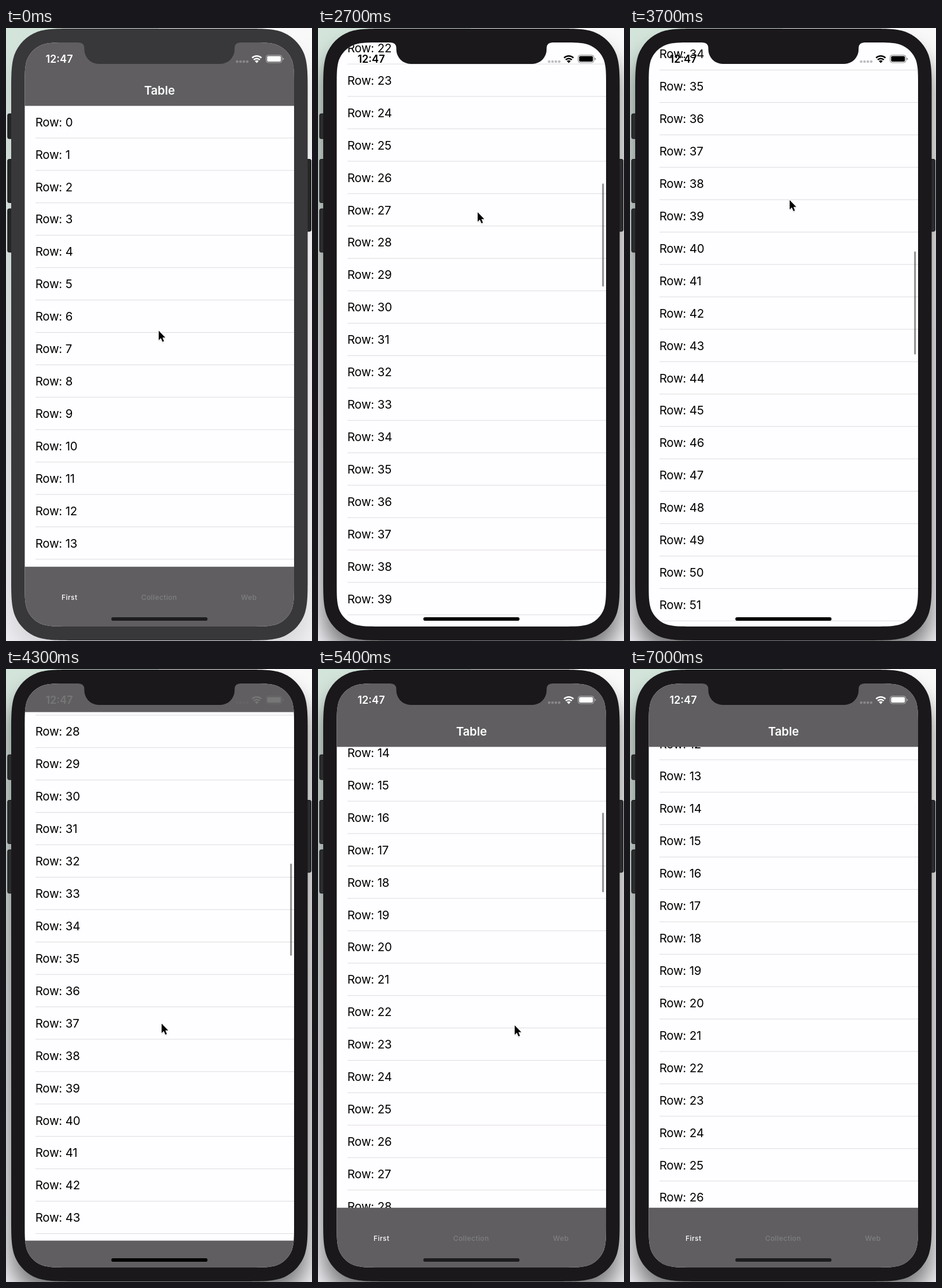
These frames come from a looping animation (529x1058 px, 7400 ms). An HTML page:

```html
<!DOCTYPE html>
<html lang="en">
<head>
<meta charset="utf-8">
<title>Table</title>
<style>
  html, body { margin: 0; width: 100%; height: 100%; overflow: hidden; background: #eee; }
  svg { display: block; width: 100vw; height: 100vh; }
  text { font-family: Inter, Roboto, sans-serif; }
  .row { font-size: 20.4px; letter-spacing: -.3px; word-spacing: .6px; fill: #000; }
  .title { font-size: 20.4px; font-weight: 600; letter-spacing: -.1px; fill: #fff; text-anchor: middle; }
  .clock { font-size: 18.1px; font-weight: 600; text-anchor: middle; }
  .tab { font-size: 12.1px; font-weight: 500; letter-spacing: .4px; fill: #7f7e81; text-anchor: middle; }
</style>
</head>
<body>
<svg viewBox="0 0 529 1058" preserveAspectRatio="none">
  <defs>
    <linearGradient id="wallL" x2="0" y2="1">
      <stop offset="0" stop-color="#d3e4db"/>
      <stop offset=".35" stop-color="#d9e3df"/>
      <stop offset=".65" stop-color="#e4e6e9"/>
      <stop offset="1" stop-color="#efeff3"/>
    </linearGradient>
    <linearGradient id="wallR" x2="0" y2="1">
      <stop offset="0" stop-color="#f9f9f9"/>
      <stop offset=".5" stop-color="#f3f0f3"/>
      <stop offset="1" stop-color="#f0f0f3"/>
    </linearGradient>
    <filter id="blur" x="-20%" y="-10%" width="140%" height="120%"><feGaussianBlur stdDeviation="18"/></filter>
    <filter id="soft" x="-50%" y="-50%" width="200%" height="200%"><feGaussianBlur stdDeviation="1.2"/></filter>
    <clipPath id="screen"><path id="glass"/></clipPath>
    <path id="arrow" d="M0 0V16.2L3.8 12.8L6.5 19L9.1 17.9L6.5 11.8H11.4Z"/>
  </defs>

  <rect width="265" height="1058" fill="url(#wallL)"/>
  <rect x="264" width="265" height="1058" fill="url(#wallR)"/>
  <rect id="shadow" x="9" y="32" width="512" height="1050" rx="70" filter="url(#blur)"/>

  <g id="buttons" stroke="#161517" stroke-width="1">
    <rect x="2.8" y="148" width="12" height="43" rx="2.5"/>
    <rect x="2.8" y="226.5" width="12" height="75" rx="2.5"/>
    <rect x="2.8" y="312" width="12" height="75" rx="2.5"/>
    <rect x="515" y="226.5" width="12.4" height="124.5" rx="2.5"/>
  </g>
  <path id="body" class="bezel"/>

  <g clip-path="url(#screen)">
    <rect x="32" y="24" width="467" height="1010" fill="#fefdff"/>
    <g id="rows"></g>
    <rect id="thumb" x="491.2" width="3.1" rx="1.55" fill="#000"/>
    <g id="nav">
      <rect x="32" y="-80" width="467" height="214.4" fill="#605e61"/>
      <text class="title" x="265.3" y="114.5">Table</text>
    </g>
    <g id="tabs">
      <rect x="32" y="929.8" width="467" height="200" fill="#605e61"/>
      <text class="tab" x="109.7" y="986.6" style="fill:#fff">First</text>
      <text class="tab" x="264.7" y="986.6">Collection</text>
      <text class="tab" x="420" y="986.6">Web</text>
    </g>
    <g id="status">
      <text class="clock" x="92" y="60.1">12:47</text>
      <g opacity=".25">
        <circle cx="399.6" cy="58" r="2.3"/><circle cx="405.4" cy="58" r="2.3"/>
        <circle cx="411.2" cy="58" r="2.3"/><circle cx="417" cy="58" r="2.3"/>
      </g>
      <g fill="none" stroke="currentColor" stroke-width="2.5">
        <path d="M425.4 51.6A11.7 11.7 0 0 1 441.6 51.6"/>
        <path d="M428.2 54.8A7.6 7.6 0 0 1 438.8 54.8"/>
      </g>
      <path d="M433.5 60.4L430.2 57A4.7 4.7 0 0 1 436.8 57Z"/>
      <rect x="449.7" y="46.8" width="27.2" height="13" rx="3.6" fill="none" stroke="currentColor" stroke-opacity=".5"/>
      <rect x="451.4" y="48.5" width="23.8" height="9.6" rx="2.1"/>
      <path d="M478.3 51.2Q480.2 51.8 480.2 53.3T478.3 55.4Z" opacity=".5"/>
    </g>
    <rect id="home" x="182.1" y="1016.9" width="166.3" height="6.2" rx="3.1"/>
  </g>

  <path class="bezel" d="M125 24V25Q135.4 25 135.4 35V37A25 25 0 0 0 160.4 62H370.2A25 25 0 0 0 395.2 37V35Q395.2 25 405.6 25V24Z"/>

  <g id="cursor">
    <use href="#arrow" y="1.5" fill="#000" opacity=".35" filter="url(#soft)"/>
    <use href="#arrow" fill="#000" stroke="#fff" stroke-width="2" stroke-linejoin="round" paint-order="stroke"/>
  </g>
</svg>
<script>
const LOOP = 7400, STEP = 100, PITCH = 55.92, TOP = 134.2, POOL = 20;
const NS = 'http://www.w3.org/2000/svg';
const $ = id => document.getElementById(id);
const set = (el, attrs) => { for (const k in attrs) el.setAttribute(k, attrs[k]); };
const clamp = x => Math.min(1, Math.max(0, x));
const lerp = (a, b, u) => a + (b - a) * u;
const ramp = (t, a, b) => clamp((t - a) / (b - a));
const ease = u => u * u * (3 - 2 * u);

// Rounded rectangle whose corners blend smoothly into the sides
function smoothRect(x, y, w, h, r) {
  const side = [1.529, 1.088, .868, .631, .373, .169, .075, 0, 0, 0];
  const corner = side.map((a, i) => [a * r, side[9 - i] * r]);
  const turn = [...corner].reverse();
  const join = pts => pts.map(p => p.join(' ')).join(' ');
  const arc = pts => `L${join(pts.slice(0, 1))}C${join(pts.slice(1))}`;
  const right = ([a, b]) => [x + w - a, y + b], low = ([a, b]) => [x + w - a, y + h - b];
  const left = ([a, b]) => [x + a, y + h - b], high = ([a, b]) => [x + a, y + b];
  return `M${x + w / 2} ${y}` + arc(corner.map(right)) + arc(turn.map(low)) +
    arc(corner.map(left)) + arc(turn.map(high)) + 'Z';
}
set($('body'), { d: smoothRect(9, 1, 512.5, 1056, 72) });
set($('glass'), { d: smoothRect(32.4, 25, 465.6, 1008, 48.5) });

const rows = Array.from({ length: POOL }, () => {
  const g = document.createElementNS(NS, 'g');
  const label = document.createElementNS(NS, 'text');
  const line = document.createElementNS(NS, 'rect');
  set(label, { class: 'row', x: 50.8, y: 35.5 });
  set(line, { x: 51, y: PITCH - .7, width: 448, height: 1, fill: '#dcdbdf' });
  g.append(label, line);
  $('rows').append(g);
  return { g, label };
});

// time, x, y of the pointer tip
const path = [
  [1000, 264, 522.5], [1200, 262, 548], [1500, 260.5, 630], [1800, 264, 714],
  [1900, 266, 718], [2000, 266, 718], [2100, 266, 668], [2200, 271, 530],
  [2300, 276, 330], [2400, 276, 318], [3300, 276, 318], [3600, 276, 297],
  [4050, 276, 297], [4230, 269, 612], [5300, 269, 612], [5400, 340, 615], [5500, 495, 620]
];

function pointer(t) {
  const i = path.findIndex(p => p[0] >= t);
  if (i < 0) return null;
  if (i === 0) return path[0].slice(1);
  const a = path[i - 1], b = path[i], u = ramp(t, a[0], b[0]);
  return [lerp(a[1], b[1], u), lerp(a[2], b[2], u)];
}

// Two drags, each followed by a decaying fling
const flingUp = t => 2122 - 764 * Math.exp((2700 - t) / 500);
const flingDown = t => Math.max(704.2, 698.5 + 339 * Math.exp((4800 - t) / 500));

function scroll(t) {
  if (t < 2300) return flingUp(2300) * ramp(t, 2100, 2300) ** 1.5;
  if (t < 4050) return flingUp(t);
  if (t < 4230) return lerp(flingUp(4050), flingDown(4230), ramp(t, 4050, 4230));
  return flingDown(t);
}

function draw(t) {
  const s = scroll(t);
  const hidden = ease(ramp(t, 2250, 2450)) - ease(ramp(t, 4200, 4410));
  const focused = t >= 2200;

  const first = Math.max(0, Math.floor((s - TOP) / PITCH));
  rows.forEach(({ g, label }, i) => {
    const n = first + i;
    label.textContent = 'Row: ' + n;
    set(g, { transform: `translate(0 ${TOP + n * PITCH - s})` });
  });

  set($('thumb'), {
    y: lerp(138.7 + .1365 * s, 27.6 + .1773 * s, hidden),
    height: lerp(137.4, 178, hidden),
    opacity: focused ? .44 * (1 - ramp(t, 6800, 7005)) : 0
  });
  set($('nav'), { transform: `translate(0 ${-112 * hidden})` });
  set($('tabs'), { transform: `translate(0 ${106 * hidden})` });

  const v = Math.round(255 * (1 - hidden)), ink = `rgb(${v},${v},${v})`;
  set($('status'), { fill: ink, color: ink });
  set($('home'), { fill: hidden > .5 ? '#000' : '#1c1b1d' });

  document.querySelectorAll('.bezel').forEach(el => set(el, { fill: focused ? '#1a181b' : '#383739' }));
  set($('buttons'), { fill: focused ? '#2a2c2e' : '#242526' });
  set($('shadow'), { opacity: focused ? .5 : .1 });

  const p = pointer(t);
  set($('cursor'), p
    ? { visibility: 'visible', transform: `translate(${p[0]} ${p[1]})` }
    : { visibility: 'hidden' });
}

const start = performance.now();
function tick() {
  const t = (performance.now() - start) % LOOP;
  draw(Math.floor(t / STEP) * STEP);
  requestAnimationFrame(tick);
}
tick();
</script>
</body>
</html>
```
